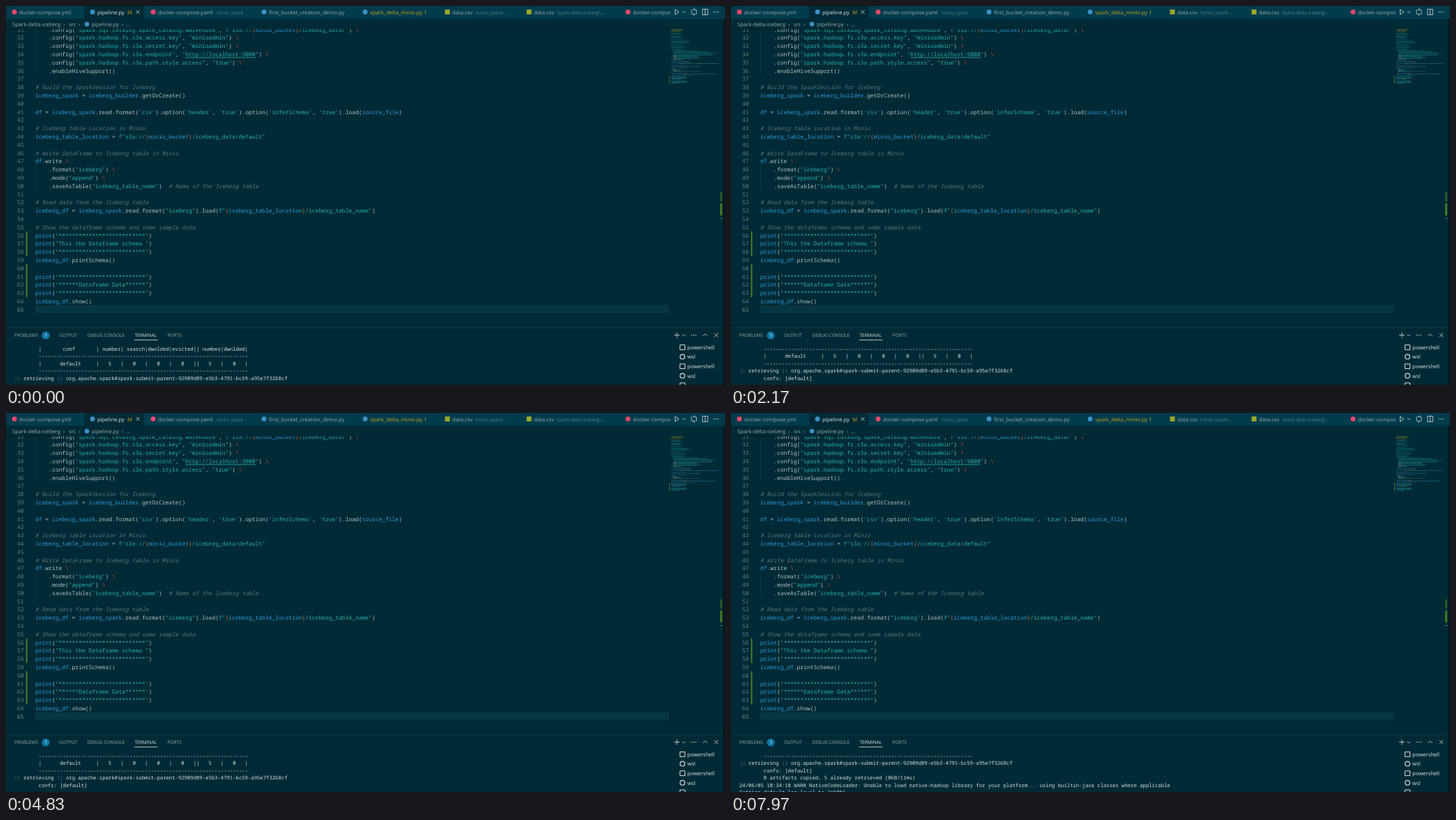
Recreate the animation shown at these times as an HTML page. Size 1031x543 px, loop 8 s.

```html
<!DOCTYPE html>
<html lang="en">
<head>
<meta charset="utf-8">
<style>
  html, body { margin: 0; height: 100%; overflow: hidden; background: #002b36; }
  svg { display: block; width: 100vw; height: 100vh; }
  text { white-space: pre; text-rendering: geometricPrecision; }
  .code { font: 7.98px "Noto Sans Mono", monospace; }
  .term { font: 7.25px "Noto Sans Mono", monospace; }
  .ui { font: 7.65px "Open Sans", sans-serif; }
  .small { font: 6.7px "Open Sans", sans-serif; }
  .caps { font: 6.55px "Open Sans", sans-serif; }
</style>
</head>
<body>
<svg id="stage" viewBox="0 0 1031 543"></svg>
<script>
const LOOP = 8000;
const CHAR = 4.788, LINE = 11.8, TERM_LINE = 10.55;
const C = {
  bg: '#002b36', strip: '#003c4c', plain: '#b4c0c2', name: '#3297de', string: '#2dada4',
  comment: '#5d747c', escape: '#dc3c34', brace: '#cb6b26', ui: '#9aa9aa', bright: '#dde4e4',
  term: '#d8dfdf', green: '#5c8a1e', ruler: '#47761f', pink: '#e5486d', python: '#3d8fc6',
  csv: '#9aa82a', yellow: '#c8a21c'
};

const stars = '*'.repeat(26);
const firstLine = 31;
const code = String.raw`    .config("spark.sql.catalog.spark_catalog.warehouse", f"s3a://{minio_bucket}/iceberg_data/") \
    .config("spark.hadoop.fs.s3a.access.key", "minioadmin") \
    .config("spark.hadoop.fs.s3a.secret.key", "minioadmin") \
    .config("spark.hadoop.fs.s3a.endpoint", "http://localhost:9000") \
    .config("spark.hadoop.fs.s3a.path.style.access", "true") \
    .enableHiveSupport()

# Build the SparkSession for Iceberg
iceberg_spark = iceberg_builder.getOrCreate()

df = iceberg_spark.read.format('csv').option('header', 'true').option('inferSchema', 'true').load(source_file)

# Iceberg table Location in Minio
iceberg_table_location = f"s3a://{minio_bucket}/iceberg_data/default"

# Write DataFrame to Iceberg table in Minio
df.write \
    .format("iceberg") \
    .mode("append") \
    .saveAsTable("iceberg_table_name")  # Name of the Iceberg table

# Read data from the Iceberg table
iceberg_df = iceberg_spark.read.format("iceberg").load(f"{iceberg_table_location}/iceberg_table_name")

# Show the dataframe schema and some sample data
print("${stars}")
print("This the Dataframe schema ")
print("${stars}")
iceberg_df.printSchema()

print("${stars}")
print("******Dataframe Data******")
print("${stars}")
iceberg_df.show()
`.split('\n');

const dashes = '-'.repeat(69), tab = ' '.repeat(8);
const terminal = [
  tab + '|       conf       | number| search|dwnlded|evicted|| number|dwnlded|',
  tab + dashes,
  tab + '|      default     |   5   |   0   |   0   |   0   ||   5   |   0   |',
  tab + dashes,
  ':: retrieving :: org.apache.spark#spark-submit-parent-92909d89-e5b3-4791-bc59-a95e7f3268cf',
  tab + 'confs: [default]',
  tab + '0 artifacts copied, 5 already retrieved (0kB/11ms)',
  '24/06/05 10:34:18 WARN NativeCodeLoader: Unable to load native-hadoop library for your platform... using builtin-java classes where applicable',
  'Setting default log level to "WARN".'
];

const stage = document.getElementById('stage');
function add(tag, attrs, parent = stage) {
  const el = document.createElementNS('http://www.w3.org/2000/svg', tag);
  for (const key in attrs) el.setAttribute(key, attrs[key]);
  return parent.appendChild(el);
}
const rect = (x, y, width, height, fill, opacity = 1) => add('rect', { x, y, width, height, fill, opacity });
const dot = (cx, cy, r, fill) => add('circle', { cx, cy, r, fill });
const stroke = (d, color = C.term, width = 0.8) => add('path', { d, fill: 'none', stroke: color, 'stroke-width': width });
function text(cls, x, y, content, fill = C.ui, parent = stage) {
  const el = add('text', { class: cls, x, y, fill }, parent);
  el.textContent = content;
  return el;
}

// Splits a line of Python into coloured runs.
function tokenize(line) {
  const runs = [];
  const pattern = /#.*|f?"[^"]*"|'[^']*'|\\|\w+|\s+|[^\w\s]/g;
  for (const { 0: part, index } of line.matchAll(pattern)) {
    if (part[0] === '#') runs.push([part, C.comment]);
    else if (/["']/.test(part)) {
      for (const piece of part.match(/[{}]|[^{}]+/g)) {
        const inBraces = part.includes('{' + piece + '}');
        runs.push([piece, /[{}]/.test(piece) ? C.brace : inBraces ? C.name : C.string]);
      }
    }
    else if (part === '\\') runs.push([part, C.escape]);
    else if (/^\w/.test(part)) runs.push([part, line[index - 1] === '.' ? C.plain : C.name]);
    else runs.push([part, C.plain]);
  }
  return runs;
}

function drawEditor() {
  const top = n => 39.6 + LINE * (n - 32);
  rect(42, top(65), 908, LINE - 0.3, '#073642');
  stroke(`M42.3 33V${top(37)}M42.3 ${top(48)}V${top(51)}`, '#174650', 0.6);
  rect(28.8, top(56), 1.6, LINE * 3, C.green);
  rect(28.8, top(60), 1.6, LINE * 4, C.green);
  code.forEach((line, i) => {
    const n = firstLine + i, y = top(n) + 8.7;
    text('code', 16, y, n, n === 65 ? '#7d9092' : '#647c82');
    const el = text('code', 42, y, '');
    for (const [part, fill] of tokenize(line)) {
      const run = add('tspan', { fill }, el);
      run.textContent = part;
      if (fill === C.comment) run.setAttribute('font-style', 'italic');
    }
    const link = line.indexOf('http');
    if (link > 0) rect(42 + link * CHAR, y + 1.6, 21 * CHAR, 0.8, C.string);
  });
}

function drawMinimap() {
  const pitch = 1.23, cell = 0.62, left = 954, top = 33;
  const above = [26, 30, 22, 24, 0, 20, 28, 0, 24, 18, 26, 0, 30, 0, 42, 38, 44, 0, 28, 0, 34, 30, 0, 26, 32, 58, 78, 88, 104, 92];
  above.forEach((length, i) =>
    rect(left + (i > 24 ? 2.5 : 0), top + i * pitch, length * cell, 0.8, i < 4 ? C.yellow : C.string, 0.35));
  code.forEach((line, i) => {
    let x = left;
    for (const [part, fill] of tokenize(line)) {
      if (part.trim()) rect(x, top + (firstLine - 1 + i) * pitch, part.length * cell, 0.8, fill, 0.42);
      x += part.length * cell;
    }
  });
  rect(951, top + 55 * pitch, 1, 3 * pitch, C.green);
  rect(951, top + 59 * pitch, 1, 4 * pitch, C.green);
  rect(1024, 267, 3, 13, C.ruler, 0.6);
  rect(1024, 283, 3, 17, C.ruler);
  rect(1024, 304, 4, 1, C.ui, 0.5);
}

function drawTabs() {
  rect(0, 0, 1031, 18.5, C.strip);
  rect(112, 0, 85.5, 18.5, C.bg);
  rect(0, 18.5, 1031, 14, C.bg);
  rect(0, 32.5, 950, 1.5, '#001820', 0.5);
  const y = 11.6;
  const tabs = [
    [12, C.pink, 'docker-compose.yml'],
    [124, C.python, 'pipeline.py', C.bright],
    [211, C.pink, 'docker-compose.yaml', C.ui, 302, 'minio_spark'],
    [370, C.python, 'first_bucket_creation_demo.py'],
    [515, C.python, 'spark_delta_minio.py', C.yellow],
    [633, C.csv, 'data.csv', C.ui, 673, 'minio_spark\\...'],
    [750, C.csv, 'data.csv', C.ui, 790, 'Spark-delta-iceberg\\...'],
    [892, C.pink, 'docker-compos']
  ];
  for (const [x, color, label, fill, noteX, note] of tabs) {
    if (color === C.csv) rect(x - 3.5, 5, 7, 7, color);
    else dot(x, 8.5, 3.5, color);
    text('ui', x + 7, y, label, fill);
    if (note) text('small', noteX, y, note, '#5f7b83');
  }
  rect(953, 0, 78, 18.5, C.strip);
  text('ui', 174, y, 'M', C.yellow);
  text('ui', 599, y, '1', C.yellow);
  stroke('M186.5 6l5 5m0-5l-5 5', C.bright);
  stroke('M959.5 5l5.5 3.6l-5.5 3.6zM969.7 7.5l2.2 2.2l2.2-2.2');
  stroke('M983 5v5a2 2 0 0 0 2 2h2.5M985.5 5h2.5a2 2 0 0 1 2 2v5M986.5 10.5l1.5 1.5l-1.5 1.5M987 3.5l-1.5 1.5l1.5 1.5');
  stroke('M998.7 4.5h7.6v8h-7.6zM1002.5 4.5v8');
  drawDots(1018, 8.5);

  [[9, 'Spark-delta-iceberg'], [82, '›'], [90, 'src'], [104, '›'], [123, 'pipeline.py'], [166, '›'], [172, '...']]
    .forEach(([x, label]) => text('ui', x, 28.8, label));
  dot(116, 26, 3.3, C.python);
}

function drawDots(x, y) {
  for (const dx of [-3, 0, 3]) dot(x + dx, y, 0.75, C.term);
}

function drawPanel() {
  rect(0, 460.5, 1028, 0.8, '#1c3948');
  const y = 474.4;
  [[12, 'PROBLEMS'], [76, 'OUTPUT'], [116.5, 'DEBUG CONSOLE'], [184.5, 'TERMINAL', C.bright], [231.5, 'PORTS']]
    .forEach(([x, label, fill]) => text('caps', x, y, label, fill));
  rect(184, 478, 33.5, 0.8, C.term);
  dot(57, 472, 5.6, '#0f79a8');
  text('caps', 55.2, y, '1', '#fff');
  stroke('M958 471.5h8m-4-4v8M969.5 470.7l2.2 2.2l2.2-2.2');
  drawDots(986, 471.5);
  stroke('M999.3 473l3.2-3.2l3.2 3.2M1015.8 468.8l5.4 5.4m0-5.4l-5.4 5.4');
  ['powershell', 'wsl', 'powershell', 'wsl', ''].forEach((label, i) => {
    const mid = 489 + i * 13.6;
    if (label === 'wsl') stroke(`M966.6 ${mid}a3.4 3.4 0 1 0 6.8 0a3.4 3.4 0 1 0 -6.8 0`, C.term, 1.2);
    else stroke(`M966.4 ${mid - 3.4}h7.2v6.8h-7.2z`, C.term, 1);
    text('ui', 977, mid + 2.7, label, C.bright);
  });
}

drawEditor();
drawTabs();
drawMinimap();
drawPanel();
rect(1028, 18.5, 3, 525, '#001a22');

const rows = Array.from({ length: 6 }, (_, i) => text('term', 12, 493.5 + i * TERM_LINE, '', C.term));
let shown = '';

function frame(now) {
  const t = now % LOOP;
  const scroll = t < 500 ? 0 : t < 6700 ? 1 : 3;
  const visible = t < 7970 ? 5 : 6;
  const state = scroll + ':' + visible;
  if (state !== shown) {
    rows.forEach((row, i) => { row.textContent = i < visible ? terminal[scroll + i] : ''; });
    shown = state;
  }
  requestAnimationFrame(frame);
}
frame(0);
</script>
</body>
</html>
```
